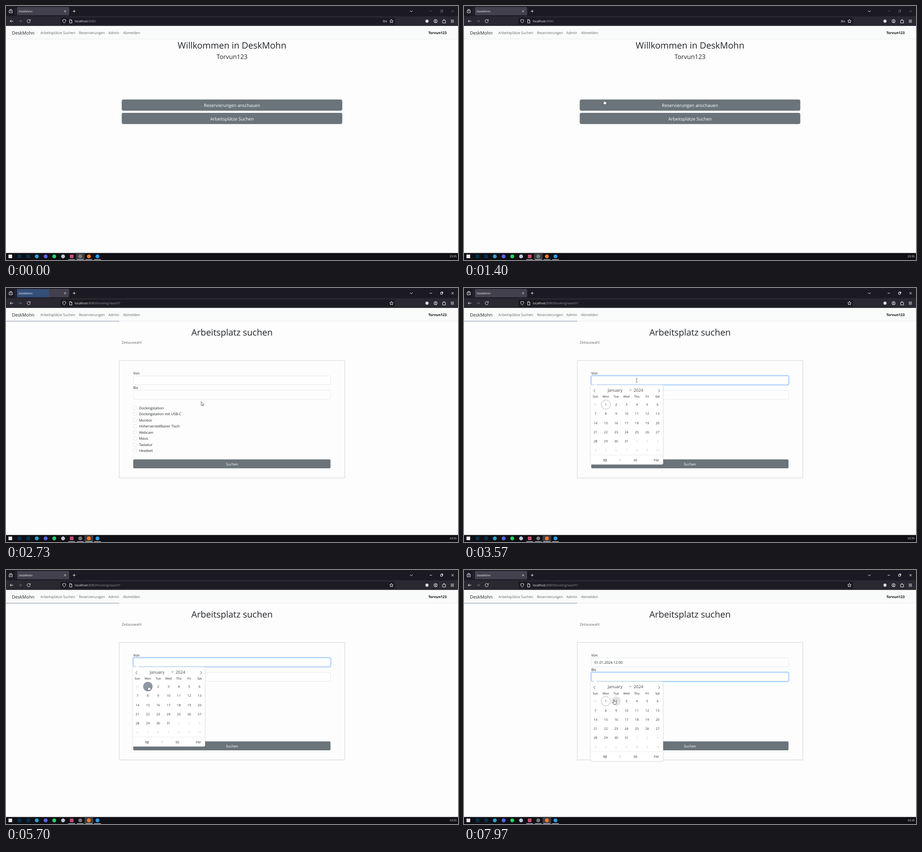
An HTML page that plays this animation: 998 px wide and 561 px high, repeating every 8000 ms.

```html
<!DOCTYPE html>
<html lang="de">
<head>
<meta charset="utf-8">
<title>DeskMohn</title>
<style>
  html, body { margin: 0; width: 100%; height: 100%; overflow: hidden; background: #fdfdfd; }
  svg { display: block; width: 998px; height: 561px; text-rendering: geometricPrecision; }
  text { font: 7.85px "Open Sans", "Noto Sans", sans-serif; fill: #212529; }
  .mid { text-anchor: middle; }
  .title { font-size: 19.6px; }
  .sub { font-size: 13.9px; }
  .brand { font-size: 9.95px; }
  .link { fill: #62666a; }
  .bold { font-weight: 700; fill: #111; }
  .big { font-size: 9.8px; }
  .onDark { fill: #fff; }
  .btn { fill: #6a747a; }
  .box { fill: #fefefe; stroke: #dee2e6; stroke-width: .8; }
  .icon { fill: none; stroke: #eeeef2; stroke-width: 1; }
  .small { font-size: 6.1px; fill: #fbfbfe; }
  .url { font-size: 6.8px; fill: #fbfbfe; }
  .url tspan { fill: #96959f; }
  .day { font-size: 7.2px; fill: #393939; }
  .other { fill: #cfcfcf; }
  .month { font-size: 9.3px; fill: #444; }
  .weekday { font-size: 6.6px; font-weight: 600; fill: #555; }
  .thin { fill: none; stroke: #444; stroke-width: .9; }
</style>
</head>
<body>
<svg viewBox="0 0 998 561">
  <rect width="998" height="561" fill="#fdfdfd"/>

  <!-- browser window -->
  <rect width="998" height="23" fill="#1b1a22"/>
  <rect y="22.5" width="998" height="21.5" fill="#2a2932"/>
  <rect x="24" y="2" width="115.5" height="18.5" rx="2.5" fill="#42414d"/>
  <rect id="burst" x="24" y="2" height="18.5" rx="2.5" fill="#2d568f"/>
  <text class="small" x="28" y="13.8">DeskMohn</text>
  <rect x="120" y="25.5" width="739" height="16" rx="2.5" fill="#1c1b22"/>
  <path d="M20.5 3V20" stroke="#3a3944"/>
  <g class="icon">
    <path d="M7 9.5h7v5.5h-7zM8 7.5h5M9 12h3"/>
    <path d="M128.5 9.5l4 4m0-4l-4 4M147.5 11.5h6m-3-3v6M892 10l3 3 3-3"/>
    <path d="M16 33.5H9m3-3l-3 3 3 3"/>
    <path d="M27.5 33.5h7m-3-3l3 3-3 3" stroke="#6b6a74"/>
    <path d="M53 31.5a3.5 3.5 0 1 0 .5 2.5M53.8 29.5v2.6h-2.6"/>
    <path d="M128.5 29.5l3.4 1.2c0 3.5-1 5.3-3.4 6.8-2.4-1.5-3.4-3.300-3.400-6.800z"/>
    <path d="M140.500 30h3l2 2v5.500h-5zM143.500 30v2h2"/>
    <path d="M851 29.500l1.200 2.600 2.800.3-2.100 1.900.6 2.800-2.500-1.400-2.500 1.400.6-2.800-2.100-1.900 2.800-.3z"/>
    <circle cx="948.500" cy="33.500" r="3.700"/><circle cx="948.500" cy="32.500" r="1.200"/><path d="M946.300 36q2.200-2 4.400 0"/>
    <path d="M964 32h2v-2h2v2h2.500v5.500H964z"/>
    <path d="M982 31h7m-7 2.500h7m-7 2.500h7"/>
    <path id="controls" d="M935.500 11.500h5M959.500 10h4v4h-4zM961 10v-1.500h3.500V12h-1M983.500 9l5 5m0-5l-5 5"/>
  </g>
  <circle cx="929.500" cy="33.500" r="3.400" fill="#dddde2"/>
  <text id="translate" class="small" x="831.500" y="36" style="font-family:'Noto Sans CJK SC','Noto Sans CJK',sans-serif">文A</text>
  <text class="url" x="152" y="36.300">localhost<tspan>:8080</tspan><tspan id="path">/booking/search?</tspan></text>

  <!-- navigation -->
  <rect y="44" width="998" height="29" fill="#f9fafa"/>
  <path d="M0 73.300H998" stroke="#e8eaec" stroke-width=".8"/>
  <text class="brand" x="13" y="63.300">DeskMohn</text>
  <text class="link" x="76" y="62.300">Arbeitsplätze Suchen</text>
  <text class="link" x="161" y="62.300">Reservierungen</text>
  <text class="link" x="226" y="62.300">Admin</text>
  <text class="link" x="258.500" y="62.300">Abmelden</text>
  <text class="bold" x="973" y="62.300" text-anchor="end">Torvun123</text>

  <g id="home">
    <text class="title mid" x="499" y="94.300">Willkommen in DeskMohn</text>
    <text class="sub mid" x="499" y="116.800">Torvun123</text>
    <rect class="btn" x="255.500" y="206.500" width="487" height="24.700" rx="4"/>
    <rect class="btn" x="255.500" y="236" width="487" height="24.700" rx="4"/>
    <text class="big mid onDark" x="499" y="222.500">Reservierungen anschauen</text>
    <text class="big mid onDark" x="499" y="252.500">Arbeitsplätze Suchen</text>
  </g>

  <g id="search">
    <path d="M0 73.300H250" stroke="#7f93a8"/>
    <text class="title mid" x="499" y="105.300">Arbeitsplatz suchen</text>
    <text class="link" x="255.500" y="123">Zeitauswahl</text>
    <rect x="250" y="160" width="498" height="259.500" fill="none" stroke="#cfd2d5"/>
    <text x="281" y="191">Von</text>
    <text x="281" y="223.300">Bis</text>
    <rect class="box" x="281" y="194" width="435.500" height="19.500" rx="2.500"/>
    <rect class="box" x="281" y="226.300" width="435.500" height="19.500" rx="2.500"/>
    <g id="focus">
      <rect x="280.300" y="193.300" width="437" height="21" rx="3.500" fill="#fff" stroke="#c0dafd" stroke-width="2.600"/>
      <rect x="281.300" y="194.300" width="435" height="19" rx="2.500" fill="none" stroke="#9cc4fc" stroke-width=".7"/>
    </g>
    <text id="from" x="288" y="206.800">01.01.2024 12:00</text>
    <g id="options"></g>
    <rect class="btn" x="281" y="378.500" width="435.500" height="19.800" rx="2.500"/>
    <text class="mid onDark" x="499" y="391.800">Suchen</text>
    <g id="calendar">
      <rect x="278" y="215" width="163" height="177" rx="4" fill="#000" opacity=".05"/>
      <rect x="279" y="214.300" width="160.500" height="175.500" rx="3" fill="#fff" stroke="#e2e2e2" stroke-width=".8"/>
      <path d="M286.500 214.800l3.500-3.500 3.500 3.500z" fill="#fff"/>
      <path class="thin" d="M289.500 223.500l-3 3.500 3 3.500M429 223.500l3 3.500-3 3.500M365.500 224l2 2 2-2"/>
      <text class="month" x="317.300" y="228.600">January</text>
      <text class="month" x="374.500" y="228.600">2024</text>
      <circle id="hover" r="10.200"/>
      <circle id="today" cx="313.200" cy="257.500" r="10.200" fill="none" stroke="#959ea9" stroke-width=".8"/>
      <g id="days"></g>
      <path d="M279.500 369H439" stroke="#e6e6e6" stroke-width=".8"/>
      <text class="day mid bold" x="311" y="382.500">12</text>
      <text class="day mid bold" x="344.500" y="382">:</text>
      <text class="day mid" x="378.500" y="382.500">00</text>
      <text class="day mid" x="424.500" y="382.500">PM</text>
    </g>
  </g>

  <!-- taskbar -->
  <rect y="545.500" width="998" height="16" fill="#0f0f14"/>
  <rect id="activeTask" y="545.500" width="19" height="16" fill="#3d3d42"/>
  <g id="tasks"></g>
  <text class="small" x="995" y="555.300" text-anchor="end">23:35</text>

  <g id="cursor" stroke="#333" stroke-width=".7" stroke-linejoin="round" fill="#fff">
    <path id="arrow" d="M0 0v8.500l2-1.800 1.400 3 1.300-.6-1.400-2.900h2.700z"/>
    <path id="hand" d="M-.8.800q.8-1.300 1.600 0v3.400l3.800.9q.9.300.8 1.300l-.6 4.200H-.4L-2.700 7q-.4-1.200.7-1l1.200.9z"/>
    <path id="beam" d="M-1.500-4h3M0-4v8M-1.500 4h3" fill="none"/>
  </g>
</svg>
<script>
const LOOP = 8000;
const ACTIVATE = 2450, NAVIGATE = 2610, OPEN_FROM = 3560, PICK = 6050, CLOSE = 6700, OPEN_TO = 7560;
const FIELD_GAP = 32.3;
const DAY_X = 290.3, DAY_Y = 257.5, DAY_W = 22.85, DAY_H = 20.25;
const $ = id => document.getElementById(id);
const show = (id, on) => $(id).style.display = on ? '' : 'none';
const set = (id, attrs) => { for (const k in attrs) $(id).setAttribute(k, attrs[k]); };

// time, x, y of the pointer tip
const pointer = [
  [400, -12, 330], [900, 250, 262], [1400, 309.5, 207], [1750, 335, 222], [2300, 430, 248],
  [2730, 431, 251], [3100, 405, 222], [3450, 382, 203], [3750, 380, 206], [4330, 351.5, 261],
  [5000, 335, 259], [5700, 314.5, 255], [6500, 314, 255], [7230, 307, 247], [7450, 306, 237],
  [7620, 306, 238], [7970, 331, 286]
];

$('options').innerHTML = ['Dockingstation', 'Dockingstation mit USB-C', 'Montior', 'Höherverstellbarer Tisch',
  'Webcam', 'Maus', 'Tastatur', 'Headset'].map((label, i) => {
    const y = 265 + i * 13.5;
    return `<rect class="box" x="281.3" y="${y - 4}" width="7.600" height="7.600" rx="1.800"/>
      <text x="293.700" y="${y + 2.9}">${label}</text>`;
  }).join('');

const dayText = (label, x, y, cls, id = '') =>
  `<text ${id} class="mid ${cls}" x="${x}" y="${y}">${label}</text>`;
let days = 'Sun Mon Tue Wed Thu Fri Sat'.split(' ')
  .map((name, i) => dayText(name, DAY_X + i * DAY_W, 242.4, 'weekday')).join('');
for (let i = 0; i < 42; i++) {
  const inMonth = i > 0 && i < 32;
  days += dayText(inMonth ? i : i ? i - 31 : 31, DAY_X + i % 7 * DAY_W, DAY_Y + 2.6 + Math.floor(i / 7) * DAY_H,
    inMonth ? 'day' : 'day other', i === 1 ? 'id="first"' : '');
}
$('days').innerHTML = days;

const square = (x, color) => `<rect x="${x - 4}" y="549" width="8" height="8" fill="${color}"/>`;
const disc = (x, color) => `<circle cx="${x}" cy="553" r="4.300" fill="${color}"/>`;
$('tasks').innerHTML = square(9.5, '#f2f2f2') + square(30, '#06304d') + square(49, '#06304d') +
  disc(68, '#2aa3cf') + disc(87.5, '#5865f2') + disc(106.5, '#1ed760') + disc(126, '#b9c9d6') +
  square(145, '#c9496f') + disc(164, '#77777c') + disc(183, '#f5762b') + disc(202, '#2b9be8') +
  [145, 164, 183, 202].map(x => `<rect x="${x - 7.5}" y="559.5" width="15" height="1.500" fill="#a9b4c0"/>`).join('');

function pointerAt(t) {
  const next = pointer.findIndex(p => p[0] > t);
  if (next === 0) return pointer[0].slice(1);
  if (next < 0) return pointer.at(-1).slice(1);
  const [t0, x0, y0] = pointer[next - 1], [t1, x1, y1] = pointer[next];
  const u = (t - t0) / (t1 - t0), e = u * u * (3 - 2 * u);
  return [x0 + (x1 - x0) * e, y0 + (y1 - y0) * e];
}

function draw(t) {
  const active = t >= ACTIVATE, searching = t >= NAVIGATE;
  const second = t >= OPEN_TO, open = t >= OPEN_FROM && t < CLOSE || second;
  const [x, y] = pointerAt(t);
  const offset = second ? FIELD_GAP : 0;

  show('home', !searching);
  show('search', searching);
  show('path', searching);
  show('translate', !searching);
  set('controls', { opacity: active ? 1 : .3 });
  set('activeTask', { x: active ? 173.5 : 154.5 });
  const age = t - NAVIGATE;
  show('burst', age >= 0 && age < 400);
  set('burst', { width: Math.max(0, Math.min(115.5, age * .59)), opacity: .65 * Math.min(1, Math.max(0, (400 - age) / 200)) });

  show('from', t >= PICK);
  show('focus', open);
  show('calendar', open);
  set('focus', { transform: `translate(0 ${offset})` });
  set('calendar', { transform: `translate(0 ${offset})` });

  const col = Math.round((x - DAY_X) / DAY_W), row = Math.round((y - offset - DAY_Y) / DAY_H);
  const onDay = col >= 0 && col < 7 && row >= 0 && row < 6;
  const onToday = onDay && row === 0 && col === 1;
  const picked = t >= PICK && !second;
  show('hover', onDay || picked);
  set('hover', {
    cx: DAY_X + (picked ? 1 : col) * DAY_W,
    cy: DAY_Y + (picked ? 0 : row) * DAY_H,
    fill: picked ? '#569ff7' : onToday ? '#8d96a3' : '#e3e3e3'
  });
  show('today', !picked);
  $('first').style.fill = picked || onToday ? '#fff' : '';

  const overButton = !searching && x > 255 && x < 743 && (y > 206 && y < 231.5 || y > 236 && y < 261);
  const overField = searching && x > 281 && x < 717 && (y > 194 && y < 213.5 || !open && y > 226 && y < 246);
  const kind = overButton || open && onDay ? 'hand' : overField ? 'beam' : 'arrow';
  for (const id of ['arrow', 'hand', 'beam']) show(id, id === kind);
  set('cursor', { transform: `translate(${x} ${y})` });
}

function frame() {
  draw(performance.now() % LOOP);
  requestAnimationFrame(frame);
}
frame();
</script>
</body>
</html>
```
